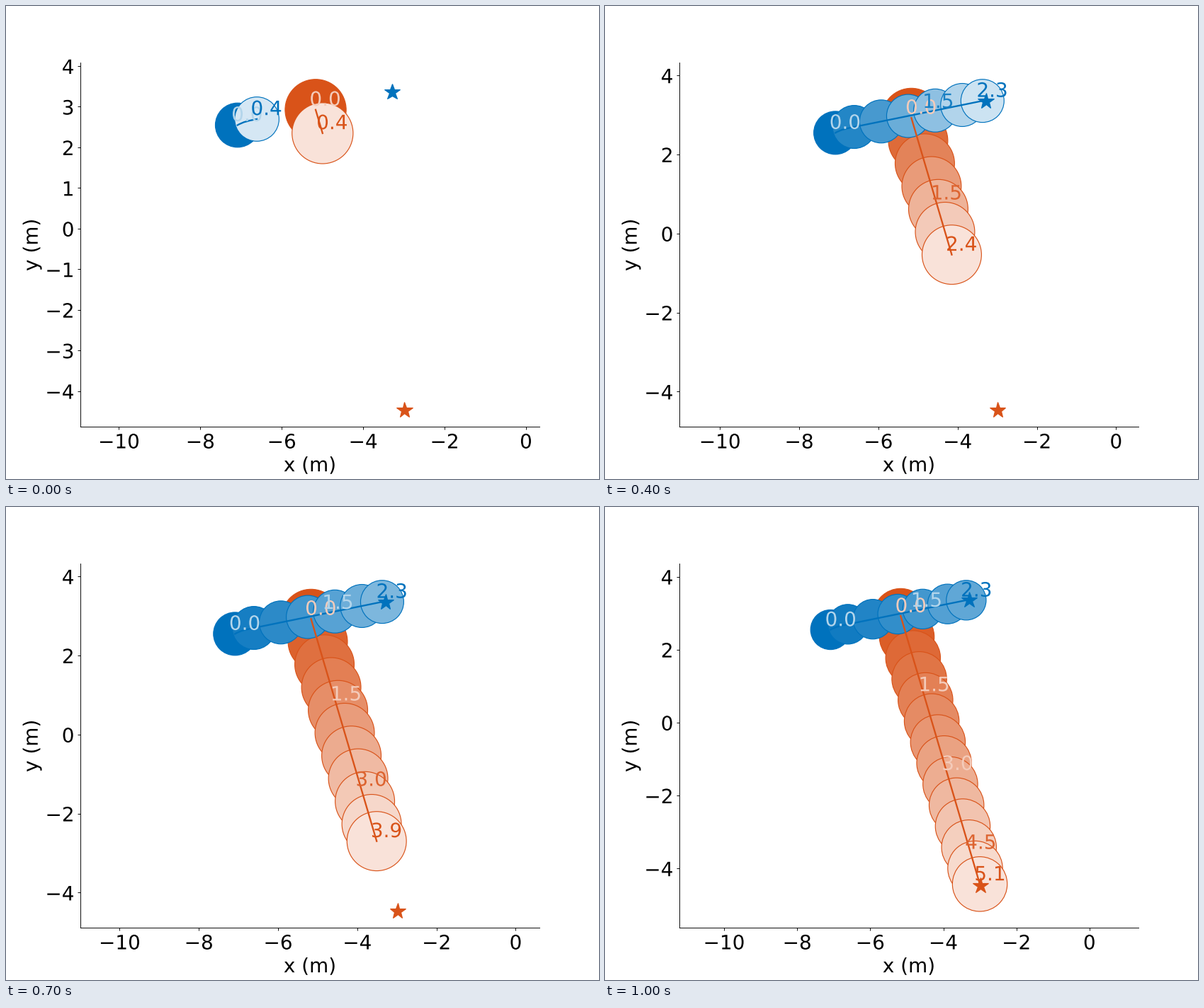
Animation, 837 px wide and 669 px high, one loop 2 s. Source, as a matplotlib script:

```python
import numpy as np
import matplotlib.pyplot as plt
from matplotlib.animation import FuncAnimation
from matplotlib.patheffects import Normal

plt.rcParams.update({
    "font.family": "DejaVu Sans",
    "font.size": 24,
    "path.effects": [Normal()],  # text as unhinted outlines at sub-pixel places
})

DPI = 669 / 8
STEP = 0.1          # simulation step, s
CIRCLE_GAP = 0.4    # s between circles
LABEL_GAP = 1.5     # s between time labels
END = 5.1
FADE = 1.2

ORANGE = np.array([0.850, 0.325, 0.098])
BLUE = np.array([0.000, 0.447, 0.741])


def orange_path(t):
    """Straight run from start to goal at constant speed."""
    return -5.168 + 0.4250 * t, 2.925 - 1.4420 * t


def blue_path(t):
    """Short turn while speeding up, then a straight run."""
    knots = [0, 0.1, 0.2, 0.3, 0.4, 2.3]
    x = np.interp(t, knots, [-7.087, -7.050, -6.930, -6.785, -6.612, -3.3725])
    y = np.interp(t, knots, [2.547, 2.568, 2.620, 2.660, 2.696, 3.356])
    return x, y


# path, goal, radius, colour, arrival time
AGENTS = [
    (orange_path, (-2.985, -4.476), 0.75, ORANGE, END),
    (blue_path, (-3.288, 3.355), 0.545, BLUE, 2.3),
]


def on_white(color, alpha):
    return tuple(1 - alpha * (1 - color))


def stamps(end, gap):
    return np.arange(0, end - STEP / 2, gap)


def draw_agent(ax, path, goal, radius, color, arrival, now):
    end = min(now, arrival)
    span = FADE * now

    def label(t, tint):
        x, y = path(t)
        ax.text(x - 0.15, y + 0.1, f"{t:.1f}", color=tint)

    steps = np.arange(round(end / STEP) + 1) * STEP
    ax.plot(*path(steps), color=color, lw=2)
    ax.plot(*goal, color=color, marker="*", ms=20)

    for t in [*stamps(end, CIRCLE_GAP), end]:
        ax.add_patch(plt.Circle(path(t), radius, ec=color,
                                fc=on_white(color, 1 - t / span)))
    for t in stamps(end, LABEL_GAP):
        label(t, on_white(color, 0.3 if t / span < 0.5 else 0.9))
    label(end, color)


def draw(i):
    now = min(0.4 + 0.5 * i, END)
    ax.clear()
    for agent in AGENTS:
        draw_agent(ax, *agent, now)
    ax.set_xlabel("x (m)")
    ax.set_ylabel("y (m)")
    ax.spines[["top", "right"]].set_visible(False)
    ax.axis("equal")
    return []


fig, ax = plt.subplots(figsize=(10.009, 8), dpi=DPI)
anim = FuncAnimation(fig, draw, frames=20, interval=100, repeat=True)
plt.show()
```
